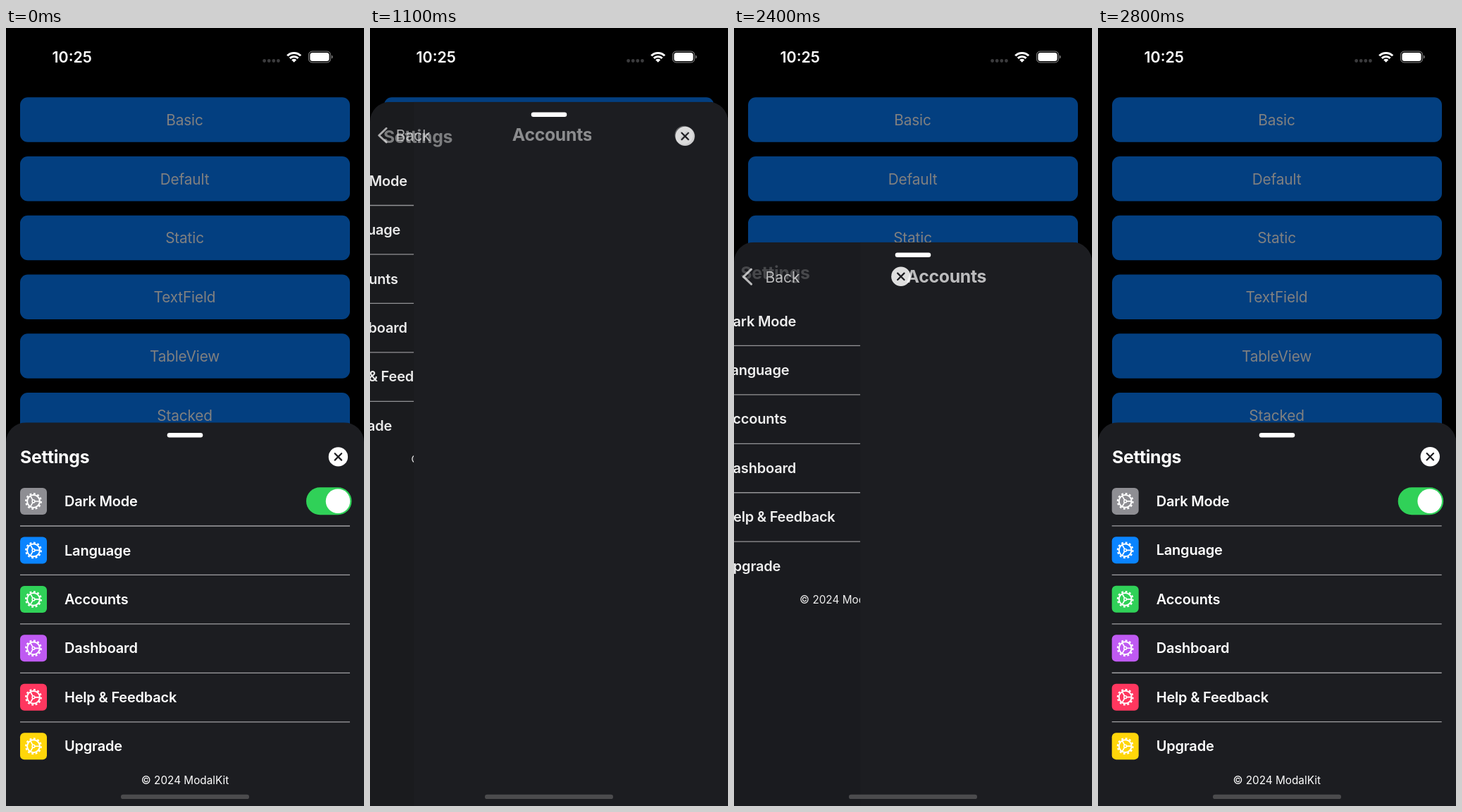
Write an HTML page that moves like this. It is 508 px wide and 1103 px high and loops after 2.9 s.

```html
<!DOCTYPE html>
<html lang="en">
<head>
<meta charset="utf-8">
<title>Settings sheet</title>
<style>
  html, body { margin: 0; width: 100%; height: 100%; overflow: hidden; background: #000; }
  svg { display: block; width: 508px; height: 1103px; }
  text { font-family: Inter, Roboto, sans-serif; fill: #fff; }
  .button { font-size: 20.8px; letter-spacing: -.15px; fill: #808080; text-anchor: middle; }
  .row { font-size: 20px; font-weight: 600; letter-spacing: -.2px; }
  .title { font-size: 24.8px; font-weight: 700; letter-spacing: -.3px; }
  .back { font-size: 21px; }
  .note { font-size: 15.3px; text-anchor: middle; }
  .time { font-size: 21.4px; font-weight: 600; }
  .line { fill: none; stroke: #fff; stroke-linecap: round; stroke-linejoin: round; }
</style>
</head>
<body>
<svg viewBox="0 0 508 1103">
  <defs>
    <clipPath id="sheetShape"><rect width="508" height="1200" rx="28"/></clipPath>
    <clipPath id="titleClip"><rect id="titleMask" x="-1" y="30" height="40"/></clipPath>
    <g id="gear" fill="none" stroke="#fff">
      <circle r="8.9" stroke-width="2"/>
      <circle r="10.8" stroke-width="2.2" pathLength="24" stroke-dasharray="1 1"/>
      <circle r="1.9" stroke-width="1.5"/>
      <path d="M2 0H9M-1-1.7L-4.5-7.8M-1 1.7L-4.5 7.8" stroke-width="1.7"/>
    </g>
    <g id="closeIcon">
      <circle r="13.7" fill="#fff"/>
      <path d="M-4.7-4.7L4.7 4.7M4.7-4.7L-4.7 4.7" stroke="#1c1c20" stroke-width="2.2" stroke-linecap="round"/>
    </g>
  </defs>

  <rect width="508" height="1103"/>
  <g id="buttons"></g>

  <g id="sheet">
    <g clip-path="url(#sheetShape)">
      <rect width="508" height="1200" fill="#1c1d21"/>
      <g id="list"></g>
      <rect id="dim" width="508" height="1200"/>
      <rect id="page" width="508" height="1200" fill="#1c1d21"/>
    </g>
    <rect x="228.7" y="14.8" width="50.6" height="6.4" rx="3.2" fill="#fff"/>
    <g id="back">
      <path id="chevron" class="line" stroke-width="3" d="M12.5-10.5L1.5 0L12.5 10.5"/>
      <text id="backText" class="back" y="57">Back</text>
    </g>
    <g id="accounts"><g clip-path="url(#titleClip)"><text class="title" y="57">Accounts</text></g></g>
    <use id="ghost" href="#closeIcon"/>
    <text id="settings" class="title" y="58">Settings</text>
    <g id="close">
      <circle r="13.7" fill="#fff"/>
      <path id="cross" d="M-4.7-4.7L4.7 4.7M4.7-4.7L-4.7 4.7" stroke="#1c1c20" stroke-width="2.2" stroke-linecap="round"/>
    </g>
  </g>

  <text class="time" x="65.5" y="49">10:25</text>
  <g fill="#3b3b3d">
    <circle cx="366.6" cy="46.5" r="2.4"/><circle cx="373.2" cy="46.5" r="2.4"/>
    <circle cx="379.8" cy="46.5" r="2.4"/><circle cx="386.4" cy="46.5" r="2.4"/>
  </g>
  <g transform="translate(408.7 48.8)">
    <path d="M-9.5-9.5A13.5 13.5 0 0 1 9.5-9.5M-5.9-5.9A8.4 8.4 0 0 1 5.9-5.9" fill="none" stroke="#fff" stroke-width="3"/>
    <path d="M0 0L-3.5-3.5A5 5 0 0 1 3.5-3.5Z" fill="#fff"/>
  </g>
  <rect x="429.5" y="33.2" width="31" height="15.6" rx="5" fill="none" stroke="#707070" stroke-width="1.3"/>
  <rect x="431.4" y="35" width="27.2" height="12" rx="3.5" fill="#fff"/>
  <path d="M462 38.5A2.7 2.7 0 0 1 462 43.5Z" fill="#808080"/>
  <rect x="163" y="1086.7" width="182" height="6.4" rx="3.2" fill="#4b4b4d"/>
</svg>
<script>
  const $ = id => document.getElementById(id);
  const set = (id, attrs) => {
    for (const [name, value] of Object.entries(attrs)) $(id).setAttribute(name, value);
  };
  const move = (x, y, scale = 1) => `translate(${x} ${y}) scale(${scale})`;

  $('buttons').innerHTML = ['Basic', 'Default', 'Static', 'TextField', 'TableView', 'Stacked']
    .map((label, i) => `<g transform="translate(0 ${98.3 + i * 83.75})">
      <rect x="20" width="468" height="63.5" rx="11" fill="#033f80"/>
      <text class="button" x="253.5" y="39.7">${label}</text></g>`).join('');

  const rows = [
    ['Dark Mode', '#8e8e93'], ['Language', '#0a84ff'], ['Accounts', '#30d158'],
    ['Dashboard', '#bf5af2'], ['Help &amp; Feedback', '#ff375f'], ['Upgrade', '#ffd60a']
  ];
  $('list').innerHTML = rows.map(([label, color], i) => `
    <g transform="translate(0 ${111.7 + i * 69.45})">
      <rect x="20" y="-19" width="38" height="38" rx="6" fill="${color}"/>
      <use href="#gear" x="39"/>
      <text class="row" x="83" y="7.1">${label}</text>
      ${i < 5 ? '<path d="M20 35H488" stroke="#a0a0a3" stroke-width="1.3"/>' : ''}
    </g>`).join('') + `
    <rect x="426" y="92" width="64.5" height="39" rx="19.5" fill="#30d158"/>
    <circle cx="471" cy="111.5" r="17.3" fill="#fff"/>
    <text class="note" x="254" y="512.5">© 2024 ModalKit</text>`;

  const LOOP = 2900, STEP = 100, PUSH = 900, POP = 2300;
  const TALL = 78.3, SHORT = 559.3;

  // Critically damped spring, 0 to 1
  const spring = (rate, ms) => {
    const x = rate * ms / 1000;
    return 1 - (1 + x) * Math.exp(-x);
  };

  function draw(ms) {
    const time = Math.floor(ms % LOOP / STEP) * STEP;
    const opening = time >= PUSH && time < POP;
    const elapsed = time < PUSH ? LOOP : Math.max(0, time - (opening ? 898 : 2331));
    const s = spring(22.9, elapsed);
    const slide = spring(18, elapsed);
    const pushed = opening ? slide : 1 - slide;
    const fade = Math.min(1, elapsed / 350);
    const rest = 1 - s;

    set('sheet', { transform: move(0, opening ? SHORT + (TALL - SHORT) * s : TALL + (SHORT - TALL) * s) });
    set('list', { transform: move(-152.4 * pushed, 0) });
    set('dim', { opacity: .1 * pushed });
    set('page', { x: 508 * (1 - pushed) });

    set('settings', {
      transform: move(20 * s, opening ? 0 : -11 * rest),
      opacity: opening ? 1 - fade : fade
    });
    set('close', {
      transform: move(30 + 441.4 * s, 48.6),
      opacity: 1 - .9 * fade * (1 - fade)
    });
    set('cross', { transform: move(0, 0, .6 + .4 * Math.min(1, s * 3)) });
    set('ghost', {
      transform: move(471.4 * s, 48.6 - 30 * rest, s),
      opacity: opening ? 1.2 * fade * (1 - fade) : 0
    });

    const lift = opening ? -30 * rest : 0;
    set('accounts', {
      transform: move(opening ? 283 - 86 * s : 197 + 186 * s ** 1.8, lift),
      opacity: opening ? fade ** 1.3 : (1 - fade) ** 1.6
    });
    set('titleMask', { width: opening ? 120 * s : 120 - 130 * Math.max(0, s - .5) });
    set('back', {
      transform: move(0, lift),
      opacity: opening ? fade ** .85 : (1 - fade) ** 1.7
    });
    set('chevron', { transform: opening ? move(12 * s, 49, s) : move(12, 49) });
    set('backText', { x: opening ? 37.5 - 15 * rest : 37.5 + 32 * s * s });
  }

  const start = performance.now();
  function tick() {
    draw(performance.now() - start);
    requestAnimationFrame(tick);
  }
  tick();
</script>
</body>
</html>
```
